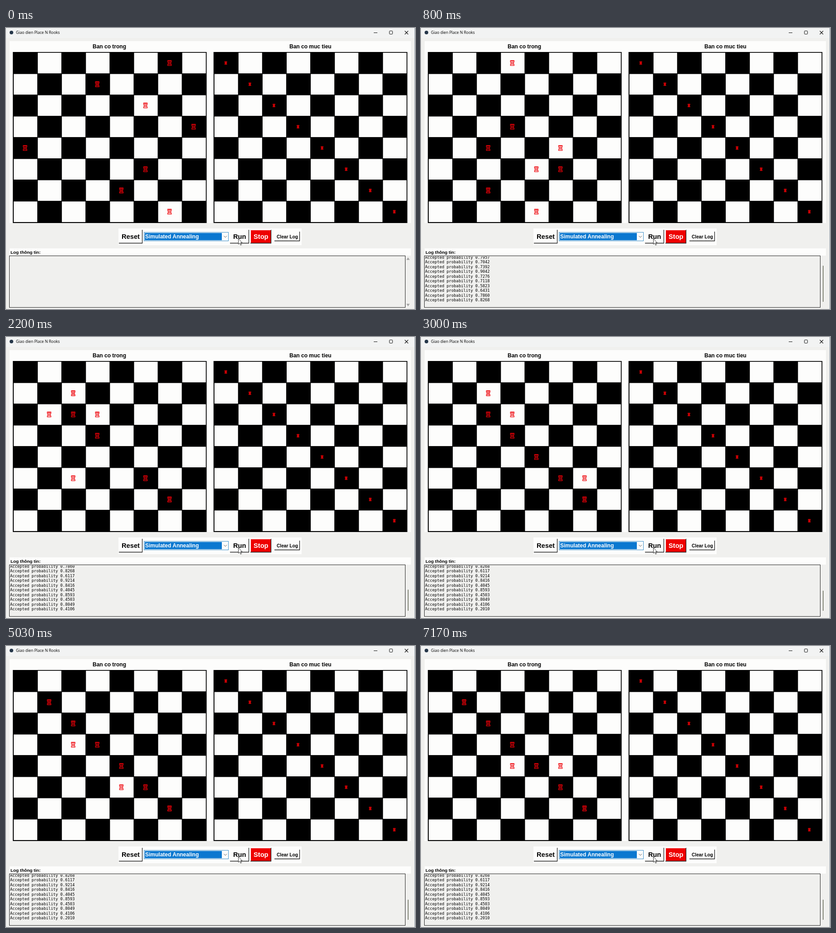
Recreate the animation shown at these times as an HTML page. Size 902 by 621 pixels, loop 8000 ms.

```html
<!DOCTYPE html>
<html lang="vi">
<head>
<meta charset="utf-8">
<title>Place N Rooks</title>
<style>
  html, body { margin: 0; width: 100%; height: 100%; overflow: hidden; background: #f0f0ee; }
  svg { display: block; }
  text { white-space: pre; }
  .ui { font-family: "Liberation Sans", Arial, sans-serif; font-weight: bold; }
  .log { font: 8.77px "DejaVu Sans Mono", monospace; }
  .cap { font: 8.6px "Open Sans", "Noto Sans", sans-serif; }
</style>
</head>
<body>
<svg id="stage" width="902" height="621" viewBox="0 0 902 621">
  <defs>
    <path id="rook" stroke="#ee0008" stroke-width="1.3"
      d="M-4-5.5V-2.5L-3-1.5V2.5L-4 3.5V5.5H4V3.5L3 2.5V-1.5L4-2.5V-5.5H2V-4.2H.9V-5.5H-.9V-4.2H-2V-5.5ZM-3-1.5H3M-3 2.5H3M-1.2.5H1.2"/>
    <clipPath id="view"><rect x="8" y="505" width="872" height="112"/></clipPath>
  </defs>
</svg>
<script>
const LOOP = 8000, N = 8;
const WHITE = '#fdfdfc', GREY = '#f0f0ee';
const stage = document.getElementById('stage');

function add(tag, attrs, parent = stage) {
  const el = document.createElementNS('http://www.w3.org/2000/svg', tag);
  for (const k in attrs) el.setAttribute(k, attrs[k]);
  parent.appendChild(el);
  return el;
}
const box = (x, y, width, height, fill, more) => add('rect', { x, y, width, height, fill, ...more });
const line = (d, stroke, width = 1) => add('path', { d, stroke, 'stroke-width': width, fill: 'none' });
const show = (el, on) => el.setAttribute('visibility', on ? 'visible' : 'hidden');

function label(str, x, y, size, fill = '#000') {
  add('text', { x, y, class: 'ui', 'font-size': size, fill }).textContent = str;
}
function button(str, x, y, w, h, size, pad, base, bg = WHITE, fg = '#000') {
  box(x, y, w, h, bg);
  line(`M${x + .5} ${y + h}V${y + .5}H${x + w}`, WHITE);
  line(`M${x} ${y + h - .5}H${x + w - .5}V${y}`, '#222', 1.3);
  label(str, x + pad, y + base, size, fg);
}

// Window frame
box(0, 0, 902, 22, '#f2f3f3');
line('M901.5 0V621', '#8d9aa6');
add('circle', { cx: 12, cy: 10, r: 4, fill: '#26374a' });
add('text', { x: 22, y: 13, class: 'cap' }).textContent = 'Giao dien Place N Rooks';
line('M811 10.5H819M879.5 6.5L887 14M887 6.5L879.5 14', '#111', 1.1);
box(845.5, 6.5, 7, 7, 'none', { stroke: '#111', rx: 1 });

// Boards
const CELL_W = 53.1, CELL_H = 46.95, GAP = 442.7;
const place = (c, r, dx = 0) => `translate(${42 + dx + CELL_W * c} ${77.3 + CELL_H * r})`;
function board(dx) {
  box(15 + dx, 53, 427.5, 378, '#000');
  for (let r = 0; r < N; r++)
    for (let c = 1 - r % 2; c < N; c += 2)
      box(17 + dx + CELL_W * c, 54.7 + CELL_H * r, CELL_W - 1.1, CELL_H - 1.4, WHITE);
}
box(8, 29, 885, 402, WHITE);
label('Ban co trong', 191, 45, 12);
label('Ban co muc tieu', 625, 45, 12);
board(0);
board(GAP);
for (let i = 0; i < N; i++)
  add('use', { href: '#rook', fill: '#a00', transform: place(i, i, GAP) + ' scale(.6)' });
const rooks = Array.from({ length: N }, () => add('use', { href: '#rook', fill: 'none' }));

// Controls
box(248, 443, 404, 37, WHITE);
button('Reset', 249, 446, 52, 30, 14.67, 6, 20);
box(304.5, 451.5, 186, 19, WHITE, { stroke: '#3d8fc9' });
box(306, 453, 170, 16, '#0b78d0');
label('Simulated Annealing', 307, 465, 12, '#fff');
line('M480.5 459.5L483.8 462.8L487 459.5', '#555');
button('Run', 494, 446, 42, 30, 14.67, 7, 20);
button('Stop', 539, 446, 46, 30, 14.67, 7, 20, '#ee0000', '#fff');
button('Clear Log', 592, 450, 56, 21, 10.2, 5, 14.5);

// Log
const PITCH = 10.5, ROWS = 10;
box(8, 487, 885, 16, WHITE);
label('Log thông tin:', 10, 499, 9.9);
box(7.5, 503.5, 873, 114, GREY, { stroke: '#222' });
const arrows = add('path', { d: 'M883 512.5L886.7 507L890.4 512.5ZM883 609.5L886.7 615L890.4 609.5Z', fill: '#a3a3a3' });
const thumb = box(886, 517, 1.6, 88, '#6c705f');
const lines = add('g', {}, add('g', { 'clip-path': 'url(#view)' }));
const entries = ('0.9385 0.7957 0.7042 0.7392 0.9042 0.7276 0.7118 0.5823 0.6431 0.7860 ' +
  '0.8268 0.6117 0.9214 0.8416 0.4045 0.8593 0.4503 0.8049 0.4106 0.2010').split(' ').map((p, i) => {
  const el = add('text', { x: 9, y: 513 + PITCH * i, class: 'log' }, lines);
  el.textContent = 'Accepted probability ' + p;
  return el;
});

// Mouse pointer
add('path', {
  d: 'M512.5 465.5V478L515.3 475.4L517.3 480L519.3 479.1L517.3 474.7H521Z',
  fill: '#fff', stroke: '#222', 'stroke-width': .9
});

// Key poses: first redraw, last redraw, log length, column+row of each rook
const poses = [
  [0, 0, 0, '60 31 52 73 04 55 46 67'],
  [30, 330, 4, '50 13 52 74 34 55 16 07'],
  [370, 800, 11, '30 33 45 54 24 55 26 47'],
  [870, 2200, 19, '21 33 32 66 22 55 25 12'],
  [2270, 2470, 20, '21 33 32 66 22 55 65 44'],
  [3900, 3900, 20, '21 56 11 66 22 55 65 44'],
  [4000, 4130, 20, '32 33 11 66 22 55 54 44'],
  [4970, 5030, 20, '23 33 11 66 22 55 45 44'],
  [7000, 7170, 20, '34 33 11 66 22 55 54 44']
].map(([start, end, log, cells]) => ({ start, end, log, cells: cells.split(' ') }));

let seed = 11;
const rand = n => {
  seed = (seed * 1103515245 + 12345) % 2147483648;
  return Math.floor(seed / 2147483648 * n);
};

// Rooks switch to the next pose one by one; while hot, one also strays
const states = [];
poses.forEach((to, p) => {
  const from = poses[Math.max(0, p - 1)];
  const gap = to.end > 800 ? 70 : 33;
  const steps = Math.max(1, Math.round((to.end - to.start) / gap) + 1);
  for (let s = 1; s <= steps; s++) {
    const part = s / steps;
    const t = to.end - (to.end - to.start) * (steps - s) / Math.max(1, steps - 1);
    const cells = from.cells.map((c, j) => (j * 3 + p) % N < N * part ? to.cells[j] : c);
    if (part < 1 && t < 2200) {
      const stray = `${rand(N)}${rand(N)}`;
      if (!cells.includes(stray)) cells[rand(N)] = stray;
    }
    states.push({ t, cells, log: Math.floor(from.log + (to.log - from.log) * part) });
  }
});

function draw(t) {
  const { cells, log } = states.filter(s => s.t <= t).pop();
  rooks.forEach((el, i) => el.setAttribute('transform', place(+cells[i][0], +cells[i][1])));

  const full = log >= ROWS, h = 900 / (log + .3);
  entries.forEach((el, i) => show(el, i < log));
  lines.setAttribute('transform', `translate(0 ${full ? -3.5 - PITCH * (log - ROWS) : 0})`);
  show(thumb, full);
  show(arrows, !full);
  thumb.setAttribute('y', 605 - h);
  thumb.setAttribute('height', h);
}

const begin = performance.now();
function frame() {
  draw((performance.now() - begin) % LOOP);
  requestAnimationFrame(frame);
}
frame();
</script>
</body>
</html>
```
